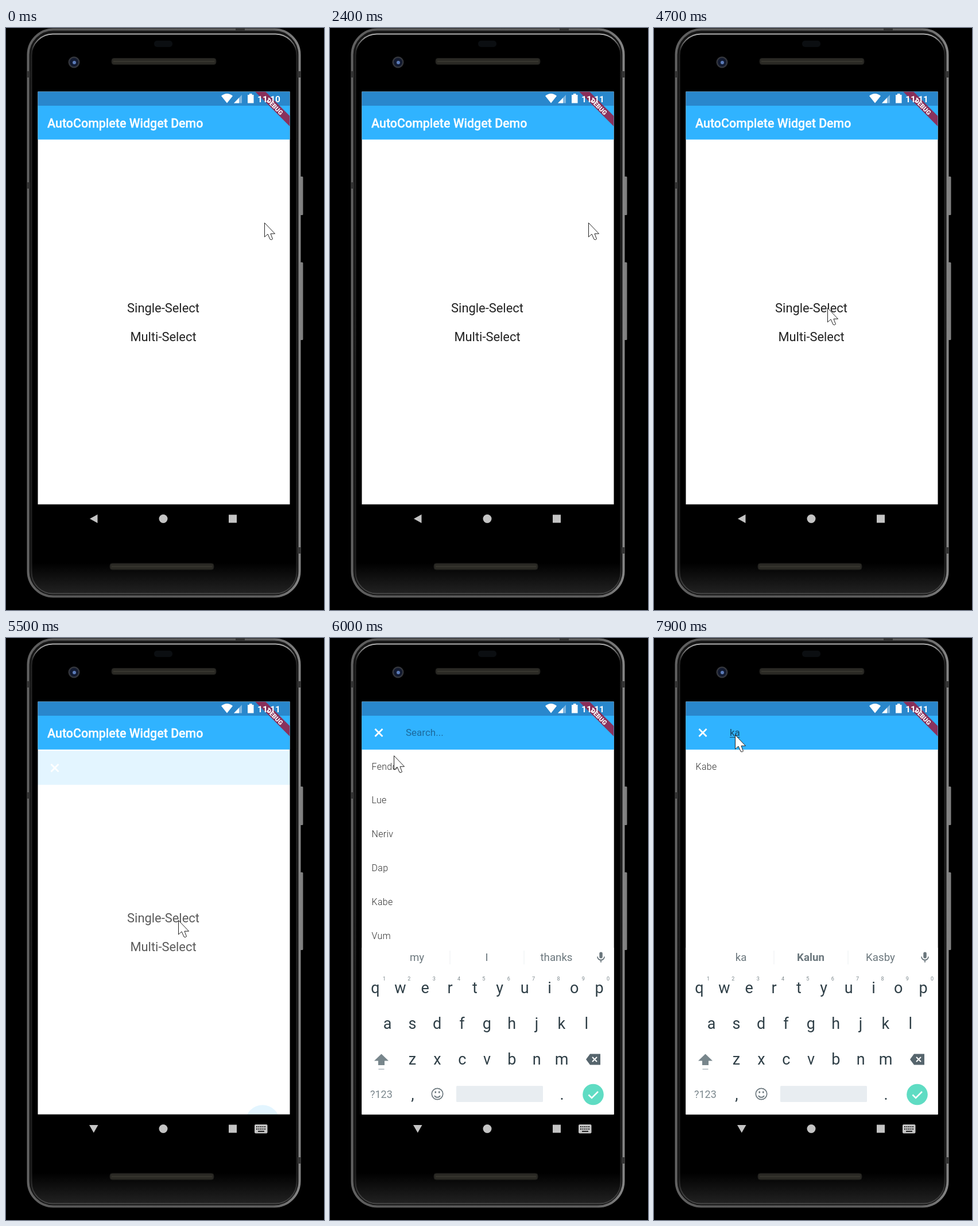
An HTML page that plays this animation: 554x1011 px, repeating every 8 s.

```html
<!DOCTYPE html>
<html lang="en">
<head>
<meta charset="utf-8">
<title>AutoComplete Widget Demo</title>
<style>
  html, body { margin: 0; width: 100%; height: 100%; overflow: hidden; background: #000; }
  svg { display: block; width: 554px; height: 1011px; font-family: Roboto, sans-serif; }
  .mid { text-anchor: middle; }
  .menu { font-size: 21.9px; fill: #222; }
  .names { font-size: 16px; font-weight: 300; letter-spacing: .3px; fill: #333; }
  .keys { font-size: 27px; fill: #2f3f47; }
  .digits { font-size: 9px; fill: #7c878c; }
  .hints { font-size: 18.7px; fill: #6b777d; }
</style>
</head>
<body>
<svg viewBox="0 0 554 1011">
  <defs>
    <clipPath id="screen"><path d="M55.500 110.500H494.500V827.500H55.500Z"/></clipPath>
    <filter id="soften" filterUnits="userSpaceOnUse" x="0" y="0" width="554" height="1011" color-interpolation-filters="sRGB">
      <feGaussianBlur stdDeviation=".55"/>
    </filter>
    <linearGradient id="body" x2="0" y2="1">
      <stop offset=".945"/><stop offset="1" stop-color="#222"/>
    </linearGradient>
    <linearGradient id="rim">
      <stop stop-color="#626262"/><stop offset=".1" stop-color="#585858"/>
      <stop offset=".9" stop-color="#606060"/><stop offset="1" stop-color="#858585"/>
    </linearGradient>
    <linearGradient id="shine" x2="0" y2="1">
      <stop stop-color="#b0b0b0"/><stop offset=".03" stop-color="#262626"/>
      <stop offset=".95" stop-color="#202020"/><stop offset="1" stop-color="#484848"/>
    </linearGradient>
  </defs>

  <!-- phone -->
  <g fill="#808080">
    <rect x="512" y="258" width="5.500" height="67" rx="1.500"/>
    <rect x="512" y="407" width="5.500" height="135" rx="1.500"/>
  </g>
  <rect x="38.500" y="2.500" width="473" height="985" rx="44" fill="#161616" stroke="url(#rim)" stroke-width="4"/>
  <rect x="44.500" y="10.500" width="462" height="972" rx="37" fill="url(#body)" stroke="url(#shine)" stroke-width="2"/>
  <path d="M36.500 75h5v11h-5zM36.500 268h5v11h-5zM508 75h5.500v11h-5.500zM508 902h5.500v11h-5.500zM400 0h16v4h-16z" fill="#333"/>
  <rect x="258" y="22" width="32" height="11" rx="5" fill="#0b0e11"/>
  <g filter="url(#soften)">
    <g fill="#2a2924" stroke="#1a1a18">
      <rect x="184" y="52.500" width="182" height="11" rx="4"/>
      <rect x="181" y="930" width="181" height="11" rx="4"/>
    </g>
    <path d="M187 58H363M184 935.500H359" stroke="#37362f" stroke-width="2"/>
    <circle cx="118.500" cy="59.500" r="10" fill="#34363c"/>
    <circle cx="118.500" cy="59.500" r="7.500" fill="#121a30"/>
    <circle cx="119" cy="60" r="3" fill="#5c7bb8"/>

    <!-- navigation -->
    <g fill="#c4c4c4">
      <path id="back"/>
      <circle cx="274" cy="852.500" r="7.500"/>
      <path d="M388 845.500h14v14h-14z"/>
      <g id="imeIcon">
        <rect x="433" y="845" width="22.500" height="15.500" rx="2"/>
        <path d="M436 849h17M436 853h17" stroke="#222" stroke-width="2" stroke-dasharray="2 1.500"/>
        <path d="M439 857h11" stroke="#222" stroke-width="2"/>
      </g>
    </g>

    <g clip-path="url(#screen)">
      <path d="M55 110H495V828H55Z" fill="#fff"/>
      <path d="M55 135H495V193.700H55Z" fill="#30b3ff"/>
      <text x="72" y="172.500" font-size="21.400" font-weight="500" fill="#fff" stroke="#fff" stroke-width=".3">AutoComplete Widget Demo</text>
      <g id="menu" class="menu mid">
        <text x="274" y="493.500">Single-Select</text>
        <text x="274" y="544">Multi-Select</text>
      </g>

      <g id="page">
        <path d="M55 193.700H495V1011H55Z" fill="#fff"/>
        <path d="M55 135H495V193.700H55Z" fill="#30b3ff"/>
        <path d="M78.500 158l13 13m0-13l-13 13" stroke="#fff" stroke-width="2.800"/>
        <g id="content">
          <text id="query" x="132" y="170" font-size="17"></text>
          <path id="underline" d="M132 172.500h17.500" stroke="#174a68"/>
          <g id="names" class="names"></g>
        </g>
        <circle cx="447" cy="780" r="30" fill="#30b3ff"/>
      </g>

      <g id="keyboard">
        <path d="M55 538H495V828H55Z" fill="#fff"/>
        <path d="M209 543v24M338 543v24" stroke="#eceff1"/>
        <g id="hints" class="hints mid"></g>
        <g id="keys" class="keys mid"></g>
        <g id="digits" class="digits mid"></g>
        <!-- microphone -->
        <rect x="469.300" y="545.500" width="5.500" height="11" rx="2.700" fill="#6b777d"/>
        <path d="M466 553.500a6 6 0 0 0 12 0M472 559.500v4" fill="none" stroke="#6b777d" stroke-width="1.800"/>
        <!-- shift and delete -->
        <path d="M89.500 722.500L102 734.500H95V742H84V734.500H77Z" fill="#78868c"/>
        <path d="M84.500 749h10" stroke="#b0bac0" stroke-width="1.500"/>
        <path d="M446 732l7-9.500h18v19h-18z" fill="#56656d"/>
        <path d="M457 728l8 8m0-8l-8 8" stroke="#fff" stroke-width="2"/>
        <!-- bottom row -->
        <text x="70" y="798.500" font-size="18" fill="#7c888e">?123</text>
        <g fill="none" stroke="#6b777d" stroke-width="1.700">
          <circle cx="187" cy="792" r="9.700"/>
          <path d="M182 795a5.500 5 0 0 0 10 0"/>
        </g>
        <path d="M182.500 787.500h2.500v3h-2.500zM189 787.500h2.500v3h-2.500z" fill="#6b777d"/>
        <rect x="220" y="778" width="151" height="28" rx="1.500" fill="#e8edf1"/>
        <circle cx="458.500" cy="793" r="18.300" fill="#5fdcc3"/>
        <path d="M450.500 793.500l5.500 5.500 11-11" fill="none" stroke="#fff" stroke-width="2.500"/>
      </g>

      <!-- status bar -->
      <path d="M55 110H495V135H55Z" fill="#2987cc"/>
      <path d="M434 110.500h18l42.500 42.500v18z" fill="#922850" fill-opacity=".92"/>
      <text class="mid" transform="translate(468.400 136.600) rotate(45)" y="3.900" font-size="10.900" font-weight="900" fill="#fff">DEBUG</text>
      <g fill="#fff">
        <path d="M375 118q10-8 20 0l-10 12.500z"/>
        <path d="M397 130.500l14-14.500v14.500z" opacity=".4"/>
        <path d="M397 130.500l9-9.300v9.300z"/>
        <path d="M421 116h3v-2h4.500v2h3v14.500H421z"/>
        <text id="clock" x="438" y="128.500" font-size="15.500" font-weight="700"></text>
      </g>
    </g>
  </g>

  <path id="pointer" d="M.5.5V25L6 20L10 29Q12 31 14.500 28.500L11 19.300H18.500Z" fill="#fff" stroke="#222" stroke-linejoin="round"/>
</svg>

<script>
const LOOP = 8000, STEP = 100;
const el = id => document.getElementById(id);
const label = (x, y, s, extra = '') => `<text x="${x}" y="${y}" ${extra}>${s}</text>`;
const clamp = v => Math.max(0, Math.min(1, v));
const people = ['Fendo', 'Lue', 'Neriv', 'Dap', 'Kabe', 'Vum'];

// time, x, y
const path = [
  [0, 450, 338], [3100, 450, 338], [3200, 450, 335], [4000, 450, 335],
  [4100, 247, 573], [4700, 302, 486], [4900, 302, 486], [5100, 300, 490],
  [5500, 300, 490], [6000, 111, 204], [6100, 127, 178], [6300, 137, 167],
  [6500, 137, 167], [6600, 142, 168], [7800, 142, 168], [7900, 141, 168], [LOOP, 141, 168]
];

const keyRow = (letters, x, y) =>
  [...letters].map((c, i) => label(x + i * 43.35, y, c)).join('');

el('keys').innerHTML = keyRow('qwertyuiop', 79, 617) + keyRow('asdfghjkl', 100, 678.5)
  + keyRow('zxcvbnm', 143.5, 741) + label(144, 802, ',') + label(404, 802, '.');
el('digits').innerHTML = keyRow('1234567890', 94.5, 595);

function pointerAt(t) {
  const i = path.findIndex(p => p[0] > t);
  const [t0, x0, y0] = path[i - 1], [t1, x1, y1] = path[i];
  const k = (t - t0) / (t1 - t0);
  return [x0 + (x1 - x0) * k, y0 + (y1 - y0) * k];
}

function render(t) {
  el('pointer').setAttribute('transform', `translate(${pointerAt(t)})`);
  el('clock').textContent = t < 1100 ? '11:10' : '11:11';

  // the search page fades in while sliding up
  const enter = clamp((t - 5390) / 300);
  const rise = 179 * (1 - enter) ** 2.35;
  el('page').setAttribute('transform', `translate(0 ${rise})`);
  el('page').setAttribute('opacity', enter * enter);
  el('content').setAttribute('opacity', clamp(enter * 2 - 0.8));
  el('menu').setAttribute('opacity', 1 - enter * 0.4);

  const open = t >= 5400;
  el('imeIcon').setAttribute('visibility', open ? 'visible' : 'hidden');
  el('back').setAttribute('d', open ? 'M145 846h15.500l-7.700 13.500z' : 'M146 852.500l13.500-7.500v15z');
  const hidden = (1 - clamp((t - 5550) / 200)) ** 2;
  el('keyboard').setAttribute('transform', `translate(0 ${290 * hidden})`);

  const typed = t < 6900 ? '' : t < 7200 ? 'k' : 'ka';
  el('query').textContent = typed || 'Search...';
  el('query').setAttribute('fill', typed ? '#174a68' : '#1c699c');
  el('underline').setAttribute('visibility', typed === 'ka' ? 'inherit' : 'hidden');
  el('names').innerHTML = people.filter(n => n.toLowerCase().includes(typed))
    .map((n, i) => label(72.5, 228.5 + i * 58.8, n)).join('');

  const done = t >= 7300;
  const hints = done ? ['ka', 'Kalun', 'Kasby'] : ['my', 'I', 'thanks'];
  el('hints').innerHTML = hints.map((h, i) =>
    label(151.5 + i * 121.5, 561, h, done && i === 1 ? 'font-weight="700"' : '')).join('');
}

function frame() {
  render(Math.floor(performance.now() % LOOP / STEP) * STEP);
  requestAnimationFrame(frame);
}
frame();
</script>
</body>
</html>
```
